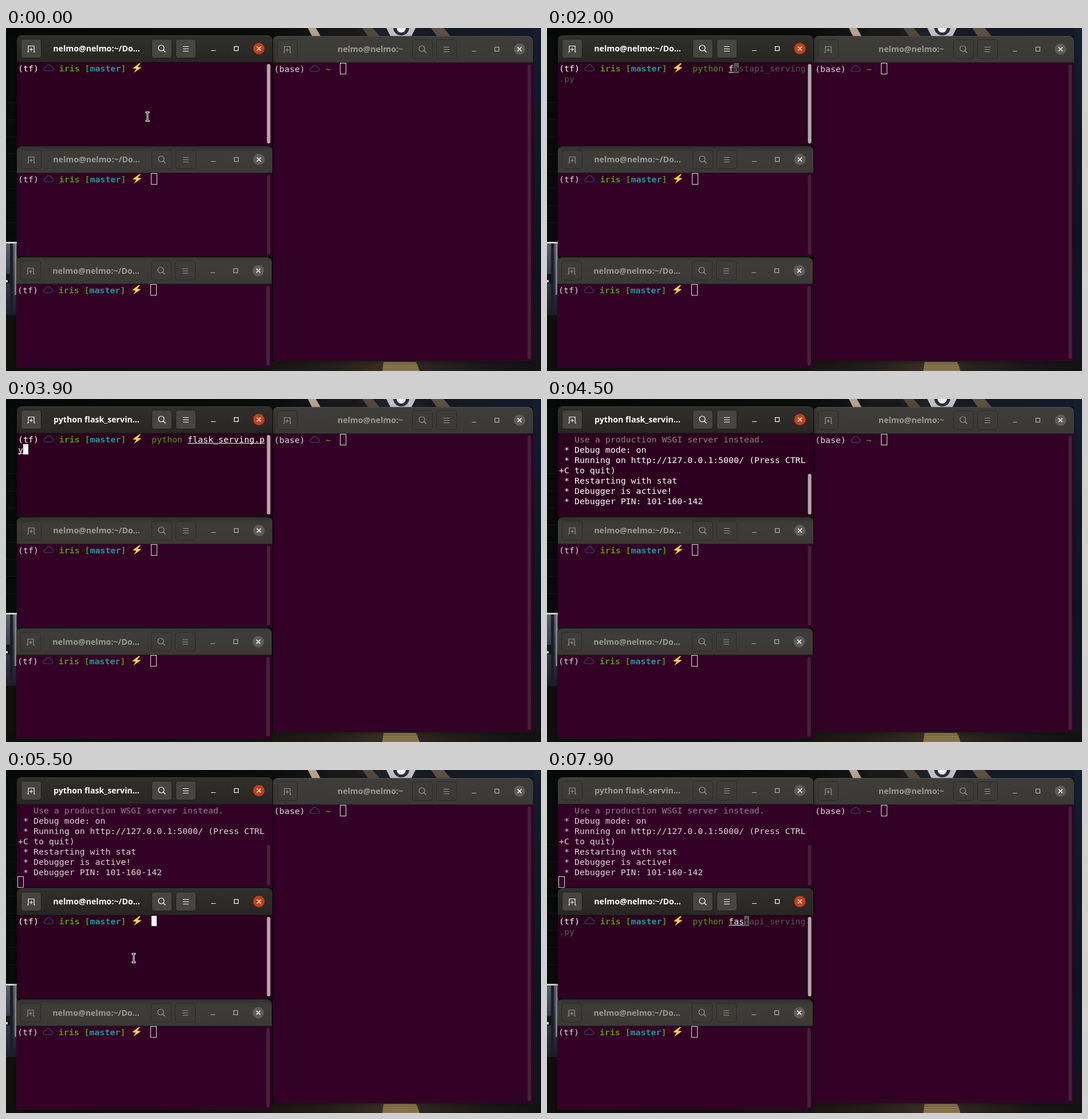
These frames come from a looping animation (934x600 px, 8000 ms). An HTML page with a canvas:

```html
<!DOCTYPE html>
<html lang="en">
<head>
<meta charset="utf-8">
<title>Terminals</title>
<style>
html, body { margin: 0; width: 100%; height: 100%; overflow: hidden; background: #0a0b0b; }
canvas { display: block; width: 100%; height: 100%; }
</style>
</head>
<body>
<canvas id="stage" width="934" height="600"></canvas>
<script>
const ctx = document.getElementById('stage').getContext('2d');
const LOOP = 8000, CELL = 8.97, ROW = 18;
const MONO = '"DejaVu Sans Mono", monospace';
const SANS = '"Noto Sans", sans-serif';
const USER = 'nelmo@nelmo:~';
const GREEN = '#4e9a06', CYAN = '#1f9a96', RED = '#cc0000', GHOST = '#555753';
const FAST = 'python fastapi_serving.py', FLASK = 'python flask_serving.py';

// [time, typed text, suggestion]
const typingA = [
  [0, ''], [700, 'p', FAST], [800, 'py', FAST], [900, 'pyt', FAST], [1000, 'pyth', FAST],
  [1200, 'pytho', FAST], [1400, 'python', FAST], [1500, 'python ', FAST],
  [2000, 'python f', FAST], [2100, 'python fas', FAST], [2400, 'python fal'],
  [2700, 'python f'], [2800, 'python fl', FLASK], [2900, 'python fla', FLASK],
  [3000, 'python flas', FLASK], [3400, FLASK]
];
const typingB = [
  [0, ''], [6100, 'p', FAST], [6200, 'py', FAST], [6500, 'pyth', FAST], [6600, 'pytho', FAST],
  [6800, 'python', FAST], [6900, 'python ', FAST], [7000, 'python f', FAST],
  [7100, 'python fs'], [7900, 'python fas', FAST]
];
const pointer = [
  [0, 247, 155], [700], [5000, 224, 291], [5100, 224, 300], [5200, 224, 312],
  [5300, 223, 322], [5400, 223, 329], [6000]
];
const log = [
  ['   WARNING: This is a development server. Do not', RED],
  [' use it in a production deployment.', RED],
  ['   Use a production WSGI server instead.', '#8d8089'],
  [' * Debug mode: on'],
  [' * Running on http://127.0.0.1:5000/ (Press CTRL'],
  ['+C to quit)'],
  [' * Restarting with stat'],
  [' * Debugger is active!'],
  [' * Debugger PIN: 101-160-142']
];

const at = (steps, t) => steps.filter(s => s[0] <= t).pop();

function rect(x, y, w, h, fill) {
  ctx.fillStyle = fill;
  ctx.fillRect(x, y, w, h);
}

function rounded(x, y, w, h, r, fill, stroke) {
  ctx.beginPath();
  ctx.roundRect(x, y, w, h, r);
  if (fill) { ctx.fillStyle = fill; ctx.fill(); }
  if (stroke) { ctx.strokeStyle = stroke; ctx.lineWidth = 1; ctx.stroke(); }
}

function disc(x, y, r, fill) {
  ctx.beginPath();
  ctx.arc(x, y, r, 0, 7);
  ctx.fillStyle = fill;
  ctx.fill();
}

function poly(points, fill) {
  ctx.beginPath();
  points.forEach(p => ctx.lineTo(...p));
  ctx.fillStyle = fill;
  ctx.fill();
}

function lines(color, width, ...paths) {
  ctx.strokeStyle = color;
  ctx.lineWidth = width;
  ctx.beginPath();
  for (const path of paths) path.forEach((p, i) => i ? ctx.lineTo(...p) : ctx.moveTo(...p));
  ctx.stroke();
}

function fade(x0, y0, x1, y1, stops) {
  const g = ctx.createLinearGradient(x0, y0, x1, y1);
  stops.forEach(([p, c]) => g.addColorStop(p, c));
  return g;
}

function backdrop() {
  rect(0, 0, 934, 600, '#080a0a');
  rect(0, 0, 934, 14, fade(0, 0, 934, 0, [[0, '#060808'], [.5, '#0b0c0c'], [.6, '#14161a'],
    [.72, '#1f2127'], [.8, '#161922'], [1, '#131a29']]));
  poly([[527, 0], [541, 0], [549, 14], [534, 14]], '#b3a38f');
  poly([[556, 0], [612, 0], [622, 14], [564, 14]], '#191818');
  poly([[622, 0], [640, 0], [652, 14], [632, 14]], '#54483c');
  poly([[664, 0], [715, 0], [708, 14], [671, 14]], '#bfc0c4');
  disc(690, -1, 14, '#2b2d38');
  disc(690, 0, 8, '#eeeff2');
  poly([[742, 0], [764, 0], [776, 14], [752, 14]], '#5d5044');
  rect(920, 0, 14, 600, fade(0, 0, 0, 600, [[0, '#151d2f'], [.35, '#111826'], [.7, '#0e1420'], [1, '#131418']]));
  for (let y = 130; y < 370; y += 30) rect(0, y, 20, 1, '#131615');
  rect(0, 374, 20, 128, fade(0, 374, 0, 502, [[0, '#5b6068'], [.4, '#3b414b'], [1, '#1b1f27']]));
  rect(0, 374, 20, 3, '#d4d4d0');
  rect(7, 377, 5, 125, '#1a1d24');
  rect(15, 377, 3, 90, '#868b93');
  rect(0, 430, 7, 17, '#141619');
  rect(0, 441, 3, 4, '#d8d8d4');
  rect(0, 502, 20, 98, '#0f100e');
  rect(0, 583, 934, 17, fade(0, 0, 934, 0, [[0, '#0e0e0d'], [.45, '#151310'], [.6, '#211d18'],
    [.7, '#372d23'], [.78, '#2b251f'], [.9, '#191716'], [1, '#121214']]));
  poly([[659, 584], [716, 584], [722, 600], [657, 600]], '#8b784f');
  for (let i = 0; i < 3; i++) rect(658, 588 + i * 4, 62, 1, '#6b5b38');
}

function text(str, x, top, color, bold) {
  ctx.font = `${bold ? 'bold ' : ''}14.9px ${MONO}`;
  ctx.textAlign = 'left';
  ctx.fillStyle = color;
  [...str].forEach((c, i) => ctx.fillText(c, x + i * CELL, top + 14.5));
}

function cloud(x, y) {
  ctx.strokeStyle = '#31566c';
  ctx.lineWidth = 1.1;
  ctx.beginPath();
  ctx.moveTo(x + 4, y + 14);
  ctx.bezierCurveTo(x - 1, y + 14, x - 1, y + 7.5, x + 4, y + 7.5);
  ctx.bezierCurveTo(x + 5, y + 2, x + 12, y + 2, x + 13, y + 7);
  ctx.bezierCurveTo(x + 18, y + 7.5, x + 17, y + 14, x + 13, y + 14);
  ctx.closePath();
  ctx.stroke();
}

function bolt(x, y) {
  poly([[x + 13, y + .5], [x + 1, y + 9.5], [x + 7.5, y + 10.5], [x + 3, y + 17.5],
    [x + 16.5, y + 8], [x + 10, y + 7], [x + 15, y + 1]], '#fbd23c');
}

function cursor(x, y, kind) {
  if (kind === 'hollow') {
    ctx.strokeStyle = '#e4dfe2';
    ctx.lineWidth = 1;
    ctx.strokeRect(Math.floor(x) - .5, y - .5, 10, 19);
  } else if (kind) {
    rect(Math.round(x), y, 9, 18, kind);
  }
}

function prompt(x, y, color) {
  text('(tf)', x, y, color);
  cloud(x + 45, y);
  text('iris', x + 8 * CELL, y, GREEN, true);
  text('[', x + 13 * CELL, y, GREEN, true);
  text('master', x + 14 * CELL, y, CYAN, true);
  text(']', x + 20 * CELL, y, GREEN, true);
  bolt(x + 199, y);
}

// One command line wrapped at 48 columns, with its suggestion and cursor
function command(x, y, [, typed, hint = ''], kind) {
  const done = typed.startsWith('python');
  const arg = typed.slice(7);
  const known = [FAST, FLASK].some(c => c.startsWith(typed));
  const cell = i => {
    const col = 26 + i;
    return [x + col % 48 * CELL, y + Math.floor(col / 48) * ROW];
  };
  const full = typed + hint.slice(typed.length);
  [...full].forEach((c, i) => {
    const [cx, cy] = cell(i);
    if (i >= typed.length) text(c, cx, cy, GHOST);
    else if (i < 7) text(c, cx, cy, done ? GREEN : RED, !done);
    else {
      text(c, cx, cy, '#fff');
      if (arg && known) rect(cx, cy + 16, CELL, 1, '#fff');
    }
  });
  const [cx, cy] = cell(typed.length);
  const next = hint[typed.length];
  cursor(cx, cy, next && kind === '#fff' ? GHOST : kind);
  if (next && kind) text(next, cx, cy, '#2c001e');
}

function button(x, y, lit) {
  rounded(x - 17.5, y - 16.5, 35, 33, 4, lit ? '#464541' : null, lit ? '#1e1d1b' : '#2a2926');
}

/* look: head = dark header, text = bright title, fill = filled buttons, body = focused body */
function frame({ x, y, w, h, title, look, bar = 0 }) {
  const { head, text: bright, fill, body } = look;
  ctx.save();
  ctx.shadowColor = body ? 'rgba(0,0,0,.5)' : 'rgba(0,0,0,.3)';
  ctx.shadowBlur = body ? 12 : 6;
  ctx.shadowOffsetY = 2;
  rounded(x, y, w, h, [8, 8, 0, 0], '#1a1716');
  ctx.restore();
  rounded(x, y, w, 46, [8, 8, 0, 0], fade(0, y, 0, y + 46, head
    ? [[0, '#302f2c'], [1, '#272623']] : [[0, '#3e3d39'], [1, '#3a3935']]));
  rect(x + 7, y, w - 14, 1, head ? '#45443f' : '#504f4a');
  rect(x, y + 46, w, 1, '#201e1c');
  rect(x, y + 47, w, h - 48, body ? '#2c001e' : '#330126');

  const cy = y + 23, right = x + w;
  const ink = bright ? '#ffffff' : '#9b9994';
  [x + 25, right - 193, right - 151].forEach(bx => button(bx, cy, fill));
  ctx.save();
  ctx.translate(x + 25, cy + .5);
  lines(ink, 1.2, [[-7, 5.5], [-5, 5.5], [-5, -5], [5, -5], [5, 5.5], [7, 5.5]],
    [[-3, 1], [3, 1]], [[0, -2], [0, 4]]);
  ctx.translate(right - 193 - x - 25, 0);
  ctx.beginPath();
  ctx.arc(-1, -1.5, 5, 0, 7);
  ctx.stroke();
  lines(ink, 1.4, [[2.5, 2], [6.5, 6]]);
  ctx.translate(42, -.5);
  lines(ink, 1.2, ...[-4, 0, 4].map(d => [[-5, d + .5], [5, d + .5]]));
  ctx.restore();

  const ctl = bright ? '#ffffff' : '#b4b2ad';
  lines(ctl, 1, [[right - 107, cy + 3.5], [right - 99, cy + 3.5]]);
  ctx.strokeStyle = ctl;
  ctx.lineWidth = 1.2;
  ctx.strokeRect(right - 66.5, cy - 3.5, 7, 7);
  const cx = right - 23.5;
  disc(cx, cy, 10, head ? '#c63e17' : '#5e5d59');
  lines('#fff', 1.5, [[cx - 3.5, cy - 3.5], [cx + 3.5, cy + 3.5]], [[cx + 3.5, cy - 3.5], [cx - 3.5, cy + 3.5]]);

  ctx.font = `bold 14.2px ${SANS}`;
  ctx.textAlign = 'center';
  ctx.fillStyle = ink;
  ctx.fillText(title, w > 450 ? x + 170 : x + 139, cy + 5);

  const top = y + 50 + bar;
  rounded(right - 9.5, top, 6, y + h - 4 - top, 3, body ? '#b3a9af' : '#47213c');
}

function output(x, y, first, count, bright) {
  log.slice(first, first + count).forEach(([str, color], i) =>
    text(str, x, y + i * ROW, color || (bright ? '#fff' : '#dcd5d9')));
}

function ibeam(x, y) {
  const shape = [[[x - 2, y - 7.5], [x + 2, y - 7.5]], [[x, y - 7.5], [x, y + 7.5]], [[x - 2, y + 7.5], [x + 2, y + 7.5]]];
  ctx.lineCap = 'square';
  lines('#fff', 3, ...shape);
  lines('#111', 1, ...shape);
  ctx.lineCap = 'butt';
}

const OFF = {}, ON = { head: 1, text: 1, fill: 1, body: 1 };

function windowA(t) {
  const focused = t < 5500;
  const scroll = t >= 4500 ? 68 : t >= 4400 ? 54 : 0;
  // The header dims one step after the body does
  const look = t < 5600 ? { ...ON, body: focused } : OFF;
  frame({ x: 19, y: 13, w: 446, h: 193, look, bar: scroll,
    title: t < 3900 ? USER + '/Do...' : 'python flask_servin...' });
  if (t >= 4400) {
    if (t < 4500) output(21, 61, 0, 7, true);
    else output(21, 61, 2, 7, focused);
    if (!focused) cursor(21, 61 + 7 * ROW, 'hollow');
    return;
  }
  prompt(21, 61, '#fff');
  const running = t >= 4200;
  command(21, 61, at(typingA, t), running || t < 400 ? null : '#fff');
  if (running) cursor(21, 97, '#fff');
}

function windowB(t) {
  const focused = t >= 5500;
  frame({ x: 19, y: 207, w: 446, h: 193, look: focused ? ON : OFF, title: USER + '/Do...' });
  prompt(21, 255, focused ? '#fff' : '#dcd5d9');
  command(21, 255, at(typingB, t), focused ? '#fff' : 'hollow');
}

function windowC() {
  frame({ x: 18, y: 401.5, w: 446, h: 193, look: OFF, title: USER + '/Do...' });
  prompt(20, 449, '#dcd5d9');
  cursor(20 + 26 * CELL, 449, 'hollow');
}

function windowD() {
  frame({ x: 466, y: 14, w: 454, h: 569, look: OFF, title: USER });
  text('(base)', 468, 62, '#dcd5d9');
  cloud(530.5, 62);
  text('~', 468 + 10 * CELL, 62, GREEN, true);
  cursor(468 + 13 * CELL, 62, 'hollow');
}

function draw(now) {
  const t = now % LOOP;
  backdrop();
  windowD();
  windowC();
  if (t < 5500) { windowB(t); windowA(t); }
  else { windowA(t); windowB(t); }
  const [, px, py] = at(pointer, t);
  if (px) ibeam(px, py);
}

const start = performance.now();
function tick() {
  draw(performance.now() - start);
  requestAnimationFrame(tick);
}
tick();
</script>
</body>
</html>
```
